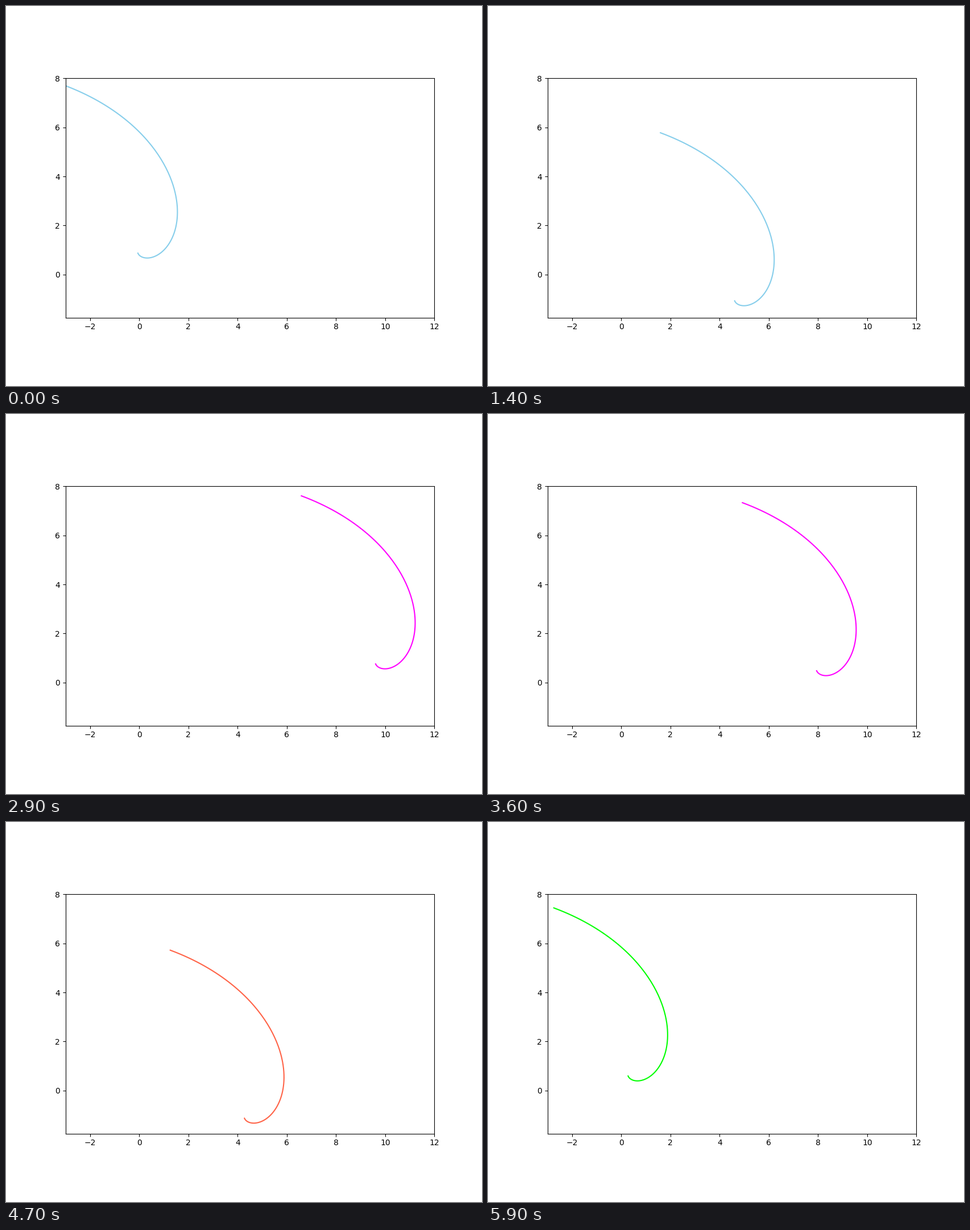
Recreate the animation shown at these times as a matplotlib script. Size 837 by 669 pixels, loop 6 s.

```python
import numpy as np
import matplotlib.pyplot as plt
from matplotlib.animation import FuncAnimation

WIDTH, HEIGHT, DPI = 837, 669, 100
FRAMES, INTERVAL = 60, 100
COLORS = ["skyblue"] + ["magenta", "tomato", "lime"] * 2

# logarithmic spiral r = e^t
t = np.linspace(-2, 2, 200)
spiral_x = np.exp(t) * np.cos(t)
spiral_y = np.exp(t) * np.sin(t)

# the small margin keeps the pixel size from being rounded down
size = ((WIDTH + 0.01) / DPI, (HEIGHT + 0.01) / DPI)
fig, ax = plt.subplots(figsize=size, dpi=DPI)
ax.set_aspect("equal")
ax.set_xlim(-3, 12)
ax.set_ylim(-1.75, 8)
line, = ax.plot([], [], lw=1.5)


def center(i):
    """Sweep right and back while bobbing along a cosine."""
    half = FRAMES // 2
    return (half - abs(i - half)) / 3, np.cos(0.2 * i)


def update(i):
    cx, cy = center(i)
    line.set_data(spiral_x + cx, spiral_y + cy)
    line.set_color(COLORS[i % len(COLORS)])
    return line,


anim = FuncAnimation(fig, update, frames=FRAMES, interval=INTERVAL,
                     repeat=True, repeat_delay=0)
plt.show()
```
